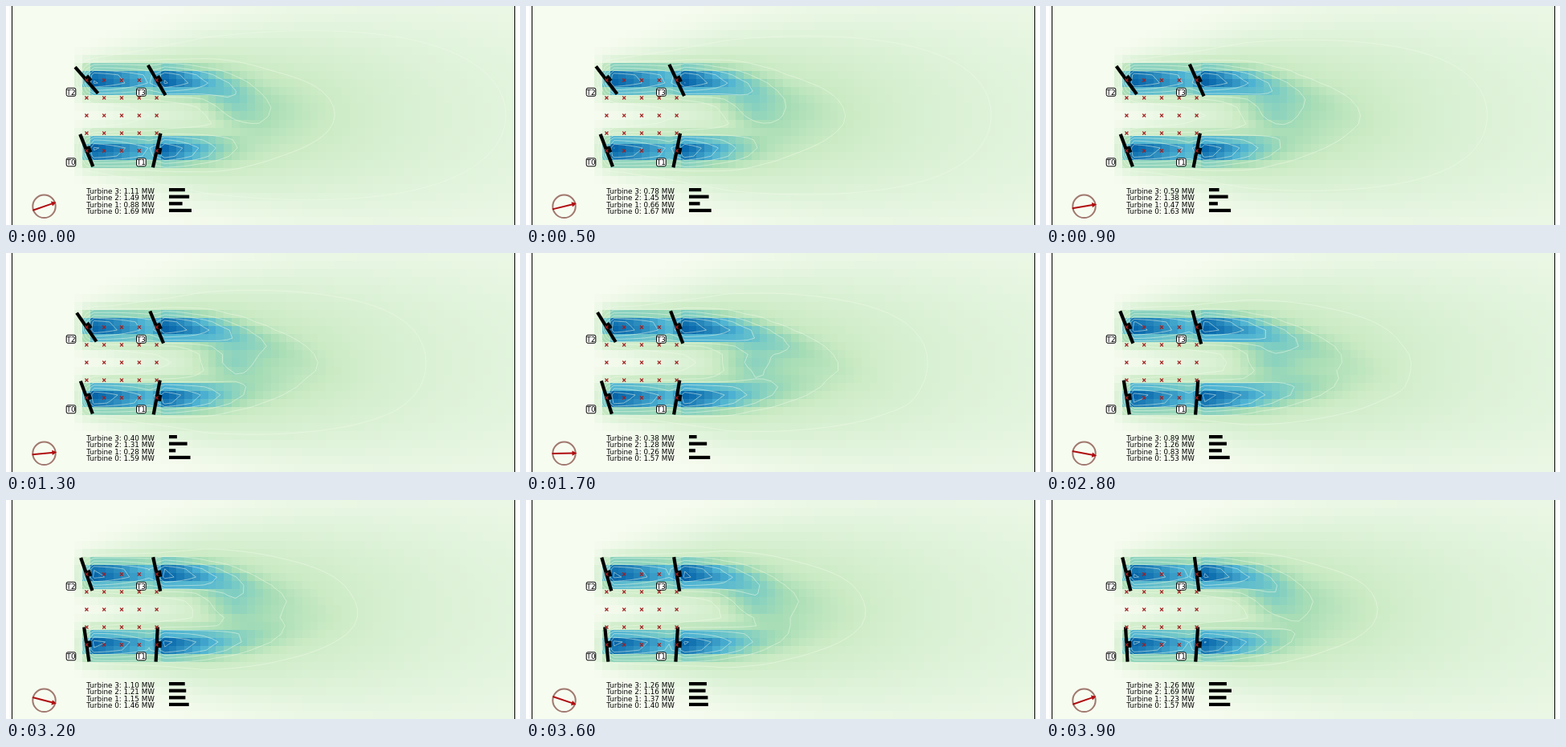
An HTML page with a canvas that plays this animation: 640 px wide and 273 px high, repeating every 4 s.

```html
<!DOCTYPE html>
<html>
<head>
<meta charset="utf-8">
<style>
html, body { margin: 0; height: 100%; overflow: hidden; background: #fff; }
canvas { display: block; }
</style>
</head>
<body>
<canvas id="stage" width="640" height="273"></canvas>
<script>
const ctx = document.getElementById('stage').getContext('2d');
const COLS = 64, ROWS = 27, LEFT = 7, CW = 626 / COLS, CH = 273 / ROWS;
const FONT = '8.75px "DejaVu Sans", sans-serif';
const PALETTE = ['f7fcf0', 'e0f3db', 'ccebc5', 'a8ddb5', '7bccc4', '4eb3d3', '2b8cbe', '0868ac', '084081']
  .map(h => [0, 2, 4].map(i => parseInt(h.slice(i, i + 2), 16)));

// Wind turbines: position, rotor yaw and power (MW) over the steps.
const SHAPE_KEYS = [0, 5, 13, 22, 28, 32, 39];
const POWER_KEYS = [0, 5, 13, 18, 22, 28, 32, 37, 38, 39];
const TURBINES = [
  { x: 100.3, y: 180, yaw: [21.8, 20.8, 20.2, 14, 9.4, 8.2, 3.3],
    power: [1.69, 1.67, 1.59, 1.56, 1.54, 1.53, 1.46, 1.38, 1.58, 1.57] },
  { x: 187.7, y: 180, yaw: [-12.7, -11.4, -10.6, -8, -4.2, -2.9, -3.8],
    power: [.88, .66, .28, .25, .44, .83, 1.15, 1.42, 1.25, 1.23] },
  { x: 100.3, y: 92.5, yaw: [41, 37.4, 34.4, 27.8, 21.8, 19.3, 13.7],
    power: [1.49, 1.45, 1.31, 1.27, 1.26, 1.26, 1.21, 1.15, 1.7, 1.69] },
  { x: 187.7, y: 92.5, yaw: [30, 25.5, 22.7, 18, 14.7, 12.1, 7.3],
    power: [1.11, .78, .4, .37, .57, .89, 1.1, 1.3, 1.28, 1.26] }
];
const REACH_TOP = [112, 120, 140, 165, 150, 128, 115];
const REACH_BOTTOM = [97, 102, 120, 165, 152, 140, 118];
const PLUME_Y = [124, 128, 135, 139, 134, 130, 125];

const clamp = (v, lo = 0, hi = 1) => Math.min(hi, Math.max(lo, v));

function sample(keys, values, s) {
  let i = 1;
  while (i < keys.length - 1 && keys[i] < s) i++;
  const f = (s - keys[i - 1]) / (keys[i] - keys[i - 1]);
  return values[i - 1] + (values[i] - values[i - 1]) * f;
}

function color(v) {
  const p = clamp(v) * 7.999, i = Math.floor(p);
  return `rgb(${PALETTE[i].map((c, k) => Math.round(c + (PALETTE[i + 1][k] - c) * (p - i)))})`;
}

function wake(x, y, turbine, amp, reach, bend) {
  const u = x - turbine.x, d = Math.max(u, 0);
  const dy = y - turbine.y - bend * (d / 100) ** 2;
  return amp * clamp((u + 10) / 16) * Math.exp(-((d / reach) ** 1.5) - Math.abs(dy / (19 + .04 * d)) ** 2.5);
}

function halo(x, y, cy) {
  const u = x - 100, d = Math.max(u, 0), dy = (y - cy) / (17 + .15 * d);
  return .3 * clamp((u + 20) / 20) * Math.exp(-dy * dy / 2 - Math.max(0, d - 150) / 350);
}

function plume(x, y, cy) {
  const u = x - 290, tilt = (139 - cy) / 15 * .35;
  const dy = (y - cy - tilt * clamp(u, -60, 30)) / (28 + .2 * Math.max(u, 0));
  return .44 * Math.exp((u < 0 ? -((u / 45) ** 2) / 2 : -u / 150) - dy * dy / 2);
}

function velocityDeficit(s) {
  const [t0, t1, t2, t3] = TURBINES;
  const top = sample(SHAPE_KEYS, REACH_TOP, s);
  const bottom = sample(SHAPE_KEYS, REACH_BOTTOM, s);
  const plumeY = sample(SHAPE_KEYS, PLUME_Y, s);
  return Array.from({ length: ROWS }, (_, j) => Array.from({ length: COLS }, (_, i) => {
    const x = LEFT + (i + .5) * CW, y = (j + .5) * CH;
    const parts = [
      wake(x, y, t0, .9, 140, 0), wake(x, y, t1, .83, bottom, -6),
      wake(x, y, t2, .9, 140, 0), wake(x, y, t3, .85, top, 11),
      halo(x, y, 92.5), halo(x, y, 180), plume(x, y, plumeY)
    ];
    return Math.cbrt(parts.reduce((sum, v) => sum + v ** 3, 0));
  }));
}

function drawField(field) {
  field.forEach((row, j) => row.forEach((v, i) => {
    const x = Math.round(LEFT + i * CW), y = Math.round(j * CH);
    ctx.fillStyle = color(v);
    ctx.fillRect(x, y, Math.round(LEFT + (i + 1) * CW) - x, Math.round((j + 1) * CH) - y);
  }));
}

// Marching squares between the cell centres.
function drawContour(field, level) {
  ctx.beginPath();
  for (let j = 0; j < ROWS - 1; j++) for (let i = 0; i < COLS - 1; i++) {
    const corners = [[i, j], [i + 1, j], [i + 1, j + 1], [i, j + 1]];
    const hits = [];
    corners.forEach(([ax, ay], k) => {
      const [bx, by] = corners[(k + 1) % 4];
      const a = field[ay][ax], b = field[by][bx];
      if ((a < level) === (b < level)) return;
      const f = (level - a) / (b - a);
      hits.push([LEFT + (ax + (bx - ax) * f + .5) * CW, (ay + (by - ay) * f + .5) * CH]);
    });
    for (let k = 0; k < hits.length; k += 2) {
      ctx.moveTo(...hits[k]);
      ctx.lineTo(...hits[k + 1]);
    }
  }
  ctx.stroke();
}

function line(x1, y1, x2, y2) {
  ctx.beginPath();
  ctx.moveTo(x1, y1);
  ctx.lineTo(x2, y2);
  ctx.stroke();
}

function drawTurbine(t, s) {
  ctx.save();
  ctx.translate(t.x, t.y);
  ctx.rotate(-sample(SHAPE_KEYS, t.yaw, s) * Math.PI / 180);
  ctx.fillStyle = '#000';
  ctx.fillRect(-2.1, -21.7, 4.2, 43.4);
  ctx.fillRect(0, -4, 6, 8);
  ctx.restore();
}

function drawSensors() {
  ctx.strokeStyle = '#a31f20';
  ctx.lineWidth = 1.1;
  for (let i = 0; i < 5; i++) for (let j = 0; j < 5; j++) {
    const x = 100.4 + i * 21.8, y = 92.5 + j * 22;
    line(x - 2, y - 2, x + 2, y + 2);
    line(x - 2, y + 2, x + 2, y - 2);
  }
}

function drawLabel(text, x, y) {
  ctx.beginPath();
  ctx.roundRect(x - 5.8, y - 5, 11.6, 10, 1.8);
  ctx.fillStyle = '#fff';
  ctx.fill();
  ctx.strokeStyle = '#000';
  ctx.lineWidth = 1;
  ctx.stroke();
  ctx.fillStyle = '#000';
  ctx.textAlign = 'center';
  ctx.fillText(text, x, y + 3.3);
}

function drawCompass(s) {
  const degrees = s < 38 ? -19 + 1.05 * s : s - 58;
  ctx.save();
  ctx.translate(47.5, 249.8);
  ctx.strokeStyle = '#a0786f';
  ctx.lineWidth = 2;
  ctx.beginPath();
  ctx.arc(0, 0, 14.2, 0, 7);
  ctx.stroke();
  ctx.rotate(degrees * Math.PI / 180);
  ctx.strokeStyle = ctx.fillStyle = '#b00c10';
  line(-15, 0, 12, 0);
  ctx.beginPath();
  ctx.moveTo(15.8, 0);
  ctx.lineTo(10, -3.2);
  ctx.lineTo(10, 3.2);
  ctx.fill();
  ctx.restore();
}

function draw(s) {
  ctx.fillStyle = '#fff';
  ctx.fillRect(0, 0, 640, 273);
  const field = velocityDeficit(s);
  drawField(field);
  ctx.strokeStyle = 'rgba(240,250,232,.55)';
  ctx.lineWidth = .9;
  for (let k = 0; k < 7; k++) drawContour(field, .12 + .125 * (k + s / 40));

  ctx.strokeStyle = '#000';
  ctx.lineWidth = 1;
  line(7.5, 0, 7.5, 273);
  line(633.5, 0, 633.5, 273);

  TURBINES.forEach(t => drawTurbine(t, s));
  drawSensors();
  ctx.font = FONT;
  TURBINES.forEach((t, i) => {
    drawLabel('T' + i, t.x - 19.3, t.y + 14.8);
    const power = sample(POWER_KEYS, t.power, s), row = 3 - i;
    ctx.textAlign = 'left';
    ctx.fillText(`Turbine ${i}: ${power.toFixed(2)} MW`, 100.3, 233.5 + row * 8.65);
    ctx.fillRect(203, 227 + row * 8.6, 4.3 + 14 * power, 4.2);
  });
  drawCompass(s);
}

let shown = -1;
function tick(now) {
  const step = Math.floor(now % 4000 / 100);
  if (step !== shown) draw(shown = step);
  requestAnimationFrame(tick);
}
draw(0);
requestAnimationFrame(tick);
</script>
</body>
</html>
```
